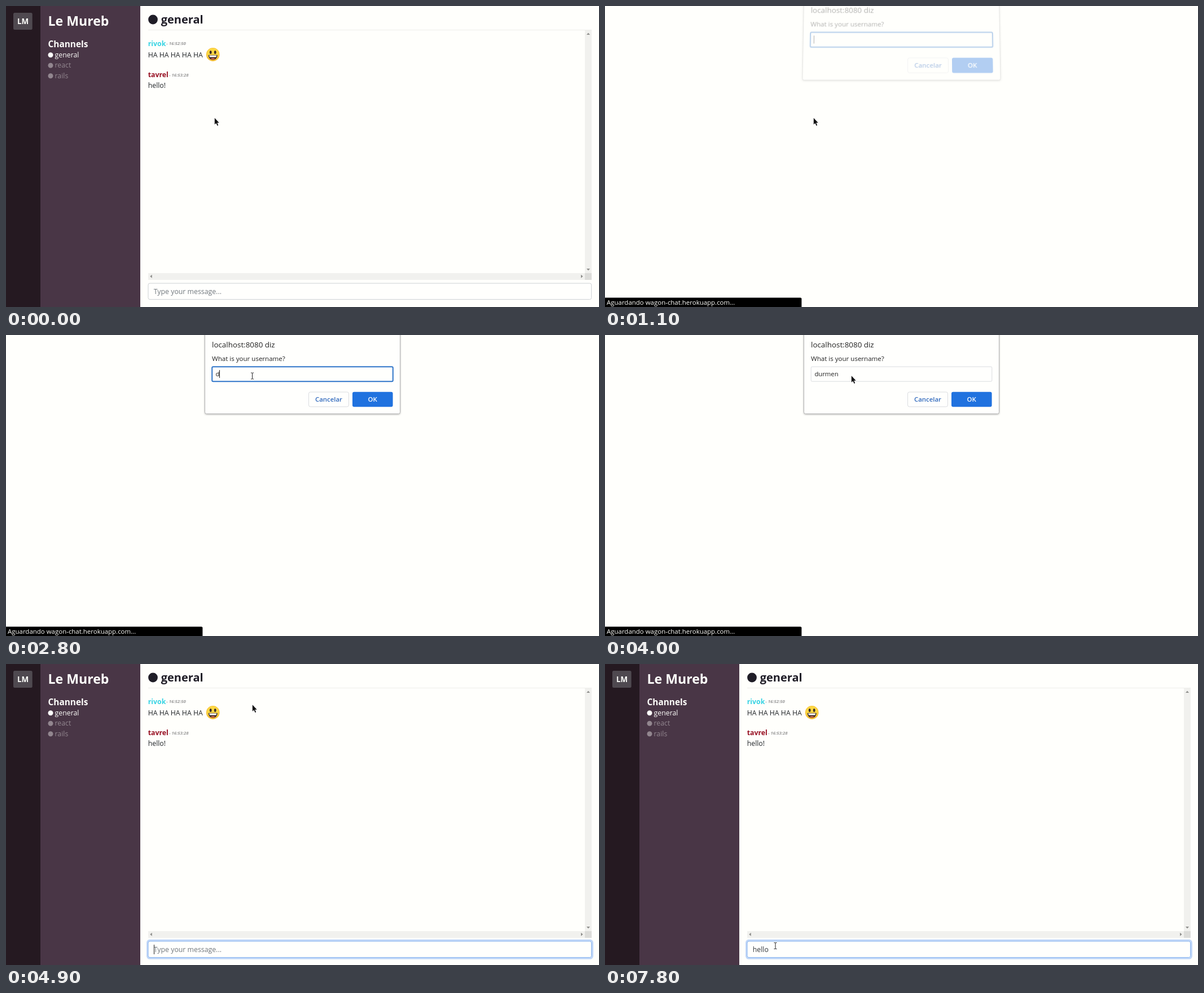
Recreate the animation shown at these times as an HTML page. Size 1051 by 533 pixels, loop 8000 ms.

```html
<!DOCTYPE html>
<html lang="en">
<head>
<meta charset="utf-8">
<title>Chat</title>
<style>
html, body { margin: 0; width: 100%; height: 100%; overflow: hidden; background: #fffffc; }
#stage { position: fixed; inset: 0; overflow: hidden; contain: strict; }
svg { position: absolute; left: 0; top: 0; width: 1051px; height: 533px; overflow: hidden; }
text { font-family: "Open Sans", "Noto Sans", sans-serif; font-size: 12.31px; white-space: pre; }
.plain text { font-family: "Liberation Sans", Arial, sans-serif; }
.plain .shift { transform: translate(-.8px, 0); }
.plain .label { transform: translate(-1.2px, -.6px); }
.plain .mark { visibility: hidden; }
.bold { font-weight: 700; }
.dim { opacity: .4; }
.time { font-size: 7.75px; font-weight: 700; font-style: italic; fill: #999; }
#dialog { height: 200px; transform-origin: 525.5px 0; }
#dialog text { font-size: 11.55px; font-weight: 500; fill: #222; }
#dialog .btn { font-size: 11.4px; font-weight: 600; text-anchor: middle; }
#box { filter: drop-shadow(0 1px 1.5px rgba(0,0,0,.28)); }
</style>
</head>
<body>
<div id="stage">
<svg id="page" viewBox="0 0 1051 533">
  <rect class="shift" x="-2" width="240" height="533" fill="#493646"/>
  <rect class="shift" x="-2" width="63" height="533" fill="#251921"/>
  <rect x="13" y="12" width="33.7" height="30" rx="2.5" fill="#4f4950"/>
  <g class="shift" fill="#fffffc">
    <text class="bold" x="30" y="31.6" text-anchor="middle" style="font-size:13.4px">LM</text>
    <text class="bold" x="74.5" y="34.5" style="font-size:23.1px">Le Mureb</text>
    <text class="bold" x="74.5" y="73.4" style="font-size:15.4px">Channels</text>
    <g>
      <circle class="mark" cx="79" cy="86.7" r="4.5"/>
      <text class="label" x="86.6" y="90.9">general</text>
    </g>
    <g class="dim">
      <circle class="mark" cx="79" cy="105.2" r="4.5"/>
      <text class="label" x="86.6" y="109.4">react</text>
    </g>
    <g class="dim">
      <circle class="mark" cx="79" cy="123.7" r="4.5"/>
      <text class="label" x="86.6" y="127.9">rails</text>
    </g>
  </g>
  <g fill="#1f1d27">
    <circle class="mark" cx="260.5" cy="24" r="8.4"/>
    <text class="bold label" x="274.7" y="31.3" style="font-size:20px">general</text>
  </g>
  <path d="M252 42.5H1038" stroke="#ededea"/>
  <path d="M1026 43h12v430h-12zM252 473h774v12H252z" fill="#f1f1ee"/>
  <path d="M1026 473h12v12h-12z" fill="#dcdcd9"/>
  <path d="M1029 51l3-3.6 3 3.6zM1029 465l3 3.6 3-3.6zM258.8 475.8l-3.6 3 3.6 3zM1019 475.8l3.6 3-3.6 3z" fill="#8f8f8c"/>

  <g id="messages" fill="#212529">
    <text class="bold" x="251.7" y="70.9" style="fill:#36d3e3">rivok</text>
    <text class="time" x="284.2" y="69.3">- 16:52:50</text>
    <text x="251.7" y="90.7">HA HA HA HA HA</text>
    <g transform="translate(366.7 85.9)">
      <circle r="11.8" fill="#f6bb30"/>
      <circle cy="-.9" r="10.6" fill="#fdd743"/>
      <ellipse cx="-4" cy="-4" rx="1.9" ry="3" fill="#3a2c26"/>
      <ellipse cx="4" cy="-4" rx="1.9" ry="3" fill="#3a2c26"/>
      <path d="M-8 .8H8C8 6.2 4.7 9.4 0 9.4S-8 6.2-8 .8Z" fill="#3f2c27"/>
      <path d="M-6.6 1.5H6.6L5.7 4.5H-5.7Z" fill="#fff"/>
      <ellipse cy="7.5" rx="3.3" ry="1.2" fill="#e0694c"/>
    </g>
    <text class="bold" x="251.7" y="126.4" style="fill:#970f22">tavrel</text>
    <text class="time" x="289" y="124.7">- 16:53:28</text>
    <text x="251.7" y="144.9">hello!</text>
  </g>

  <rect id="ring" x="250.6" y="489.3" width="788.8" height="32" rx="4" fill="none" stroke="#bfd6f8" stroke-width="3"/>
  <rect id="field" x="252" y="491" width="785.6" height="28.6" rx="3" fill="#fffffd"/>
  <text id="entry" class="shift" x="261.8" y="510"/>
  <rect id="entryCaret" class="shift" y="497" width="1" height="17" fill="#222"/>
</svg>

<svg id="dialog" viewBox="0 0 1051 200">
  <rect id="box" x="352.5" y="-20" width="346" height="159.5" rx="3" fill="#fffffd" stroke="#b5b5b5"/>
  <text x="365" y="22" style="font-size:13.4px">localhost:8080 diz</text>
  <text x="365" y="46">What is your username?</text>
  <rect id="nameField" x="365.2" y="56.2" width="320.6" height="26" rx="2" fill="#fffffd"/>
  <text id="name" x="371.4" y="73.4" style="font-size:11.3px"/>
  <rect id="nameCaret" y="62" width="1" height="14" fill="#222"/>
  <rect x="536.5" y="101" width="71" height="26" rx="3" fill="#fffffd" stroke="#dadce0"/>
  <text class="btn" x="572" y="118" style="fill:#3069bd">Cancelar</text>
  <rect x="614" y="100.7" width="71.6" height="26.6" rx="3" fill="#2072df"/>
  <text class="btn" x="649.6" y="118" style="fill:#fff">OK</text>
</svg>

<svg viewBox="0 0 1051 533">
  <g id="status">
    <path d="M0 516.6H346.4q2 0 2 2V533H0Z"/>
    <text x="3" y="529.2" fill="#fffffc" style="font-size:11.46px">Aguardando wagon-chat.herokuapp.com…</text>
  </g>
  <path id="arrow" d="M.3 .3V11.8L3 9.4 5 14 6.7 13.2 4.7 8.7H8.2Z" fill="#111" stroke="#fff" stroke-width=".8" paint-order="stroke"/>
  <g id="beam" fill="none">
    <path d="M-2.5-5.5H2.5M-2.5 5.5H2.5M0-5.5V5.5" stroke="#fff" stroke-width="2.4"/>
    <path d="M-2.5-5.5H-.7L0-5 .7-5.5H2.5M-2.5 5.5H-.7L0 5 .7 5.5H2.5M0-5V5" stroke="#222"/>
  </g>
</svg>
</div>

<script>
const LOOP = 8000, STEP = 100;
const $ = id => document.getElementById(id);
const show = (id, on) => { $(id).style.visibility = on ? "visible" : "hidden"; };
const within = (t, a, b) => t >= a && t < b;
const ramp = (t, a, b) => Math.min(1, Math.max(0, (t - a) / (b - a)));
const typed = (word, times, t) => word.slice(0, times.filter(s => t >= s).length);

// [time, opacity, tilt] of the dialog
const poses = [[0, 0, 1], [1100, .35, 1], [1200, .8, .5], [1300, 1, 0],
  [4100, .8, .65], [4200, .4, 1], [4300, .1, 1.3], [4400, 0, 1]];

// [start, end, x, y] of the pointer moves
const moves = [[1500, 2000, 435.5, 72.5], [2200, 2300, 436.5, 72.5],
  [3900, 4000, 436.5, 72], [4900, 5300, 295.5, 503],
  [5500, 5600, 301, 499], [7300, 7400, 302, 499]];

function pointer(t) {
  let x = 369.5, y = 198;
  for (const [a, b, tx, ty] of moves) {
    const p = ramp(t, a, b);
    const e = p * p * (3 - 2 * p);
    x += (tx - x) * e;
    y += (ty - y) * e;
  }
  return [x, y];
}

function caret(id, label, on) {
  const x = +label.getAttribute("x") + label.getComputedTextLength();
  $(id).setAttribute("x", Math.round(x));
  show(id, on);
}

function drawPage(t) {
  $("page").style.display = within(t, 1100, 4100) ? "none" : "";
  $("page").classList.toggle("plain", within(t, 4100, 4400));
  $("messages").style.display = within(t, 4100, 4500) ? "none" : "";
  $("ring").style.opacity = ramp(t, 4100, 4250);
  $("field").setAttribute("stroke", t >= 4200 ? "#86b3ee" : t >= 4100 ? "#b9cddd" : "#cdd1d4");

  const word = typed("hello", [6700, 6700, 6900, 7000, 7200], t);
  const entry = $("entry");
  entry.textContent = word;
  const on = within(t, 4100, 4600) || within(t, 4900, 5900) || within(t, 6700, 7800);
  caret("entryCaret", entry, on);
  if (!word) entry.textContent = "Type your message...";
  entry.setAttribute("fill", word ? "#33383d" : "#70777d");
}

function drawDialog(t) {
  const [, alpha, tilt] = poses.filter(p => t >= p[0]).pop();
  const active = t < 4000;
  $("dialog").style.opacity = alpha;
  $("dialog").style.transform = tilt
    ? `perspective(840px) translateY(${-9.7 * tilt}px) rotateX(${5 * tilt}deg)` : "none";
  $("nameField").setAttribute("stroke", active ? "#2f75c9" : "#dadce0");
  $("nameField").setAttribute("stroke-width", active ? 2 : 1);
  $("name").textContent = typed("durmen", [2800, 2900, 3200, 3300, 3400, 3600], t);
  caret("nameCaret", $("name"), active && !within(t, 1700, 2000));
}

function draw(now) {
  const t = Math.floor(now % LOOP / STEP) * STEP;
  drawPage(t);
  drawDialog(t);
  $("status").style.opacity = t < 700 ? 0 : 1 - ramp(t, 4400, 4700);
  const [x, y] = pointer(t);
  const beam = y > 490 || (t < 4000 && y < 83);
  show("beam", beam);
  show("arrow", !beam);
  $(beam ? "beam" : "arrow").setAttribute("transform", `translate(${x} ${y})`);
}

const start = performance.now();
function frame() {
  draw(performance.now() - start);
  requestAnimationFrame(frame);
}
frame();
</script>
</body>
</html>
```
